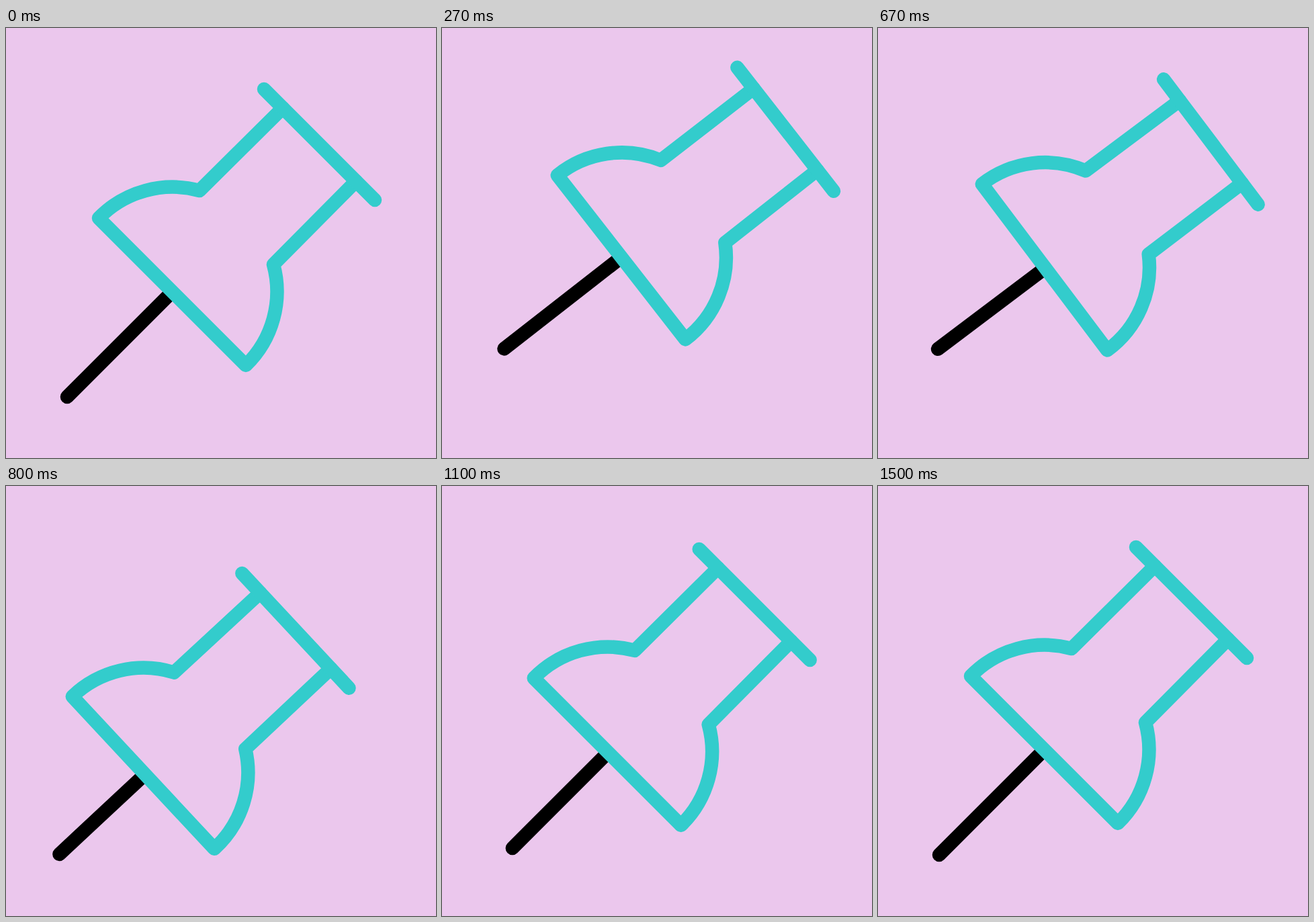
Write an HTML page that moves like this. It is 640 px wide and 640 px high and loops after 2000 ms.

```html
<!DOCTYPE html>
<html lang="en">
<head>
<meta charset="utf-8">
<title>Push pin</title>
<style>
  html, body { margin: 0; height: 100%; overflow: hidden; background: #ebc7ed; }
  svg { display: block; width: 100%; height: 100%; }
  path { fill: none; stroke: #33cccc; stroke-width: 20.5; stroke-linecap: round; stroke-linejoin: round; }
  #needle { stroke: #000; }
  #body { fill: #ebc7ed; }
</style>
</head>
<body>
<svg viewBox="0 0 640 640">
  <g id="pin">
    <path id="needle" d="M91 549L247 393"/>
    <path id="body" d="M412 119L288 242A153 153 0 0 0 138 283L357 502A153 153 0 0 0 398 352L521 228"/>
    <path d="M384 91L549 256"/>
  </g>
  <g id="sparks">
    <path pathLength="1" d="M63.7 581L55.8 466.5"/>
    <path pathLength="1" d="M63.9 584.1L184.9 563.1"/>
  </g>
</svg>
<script>
const FPS = 30, LOOP = 2000;
const LIFTED = 15, STRUCK = 27, RECOILED = 38, SETTLED = 45;
const pin = document.getElementById('pin');
const needle = document.getElementById('needle');
const sparks = document.getElementById('sparks');

// Smooth 0..1 ramp between two times; bias below 1 starts it faster
function ramp(now, from, to, bias = 1) {
  const t = Math.min(1, Math.max(0, (now - from) / (to - from))) ** bias;
  return t * t * (3 - 2 * t);
}

function render(ms) {
  const frame = Math.floor((ms % LOOP + 4) * FPS / 1000);

  const strike = ramp(frame, LIFTED, STRUCK);
  const rebound = ramp(frame, STRUCK, RECOILED, 0.85);
  const lift = ramp(frame, 0, LIFTED) - strike;
  const sink = strike - rebound;
  const recoil = rebound - ramp(frame, RECOILED, SETTLED);

  const x = 50.6 * lift - 57.5 * sink + 29.7 * recoil;
  const y = -76 * lift + 57.5 * sink - 27.2 * recoil;
  pin.setAttribute('transform', `translate(${x} ${y}) rotate(${12.8 * lift} 320 320)`);
  needle.setAttribute('transform', `translate(${42.5 * sink} ${-36.6 * sink})`);

  // Each spark shows the part of its ray between tail and head
  const head = ramp(frame, STRUCK, STRUCK + 2.8);
  const tail = ramp(frame, STRUCK, STRUCK + 4.5);
  sparks.style.visibility = head > tail ? 'visible' : 'hidden';
  sparks.style.strokeDasharray = `${head - tail} 2`;
  sparks.style.strokeDashoffset = -tail;
}

const start = performance.now();
function tick() {
  render(performance.now() - start);
  requestAnimationFrame(tick);
}
tick();
</script>
</body>
</html>
```
